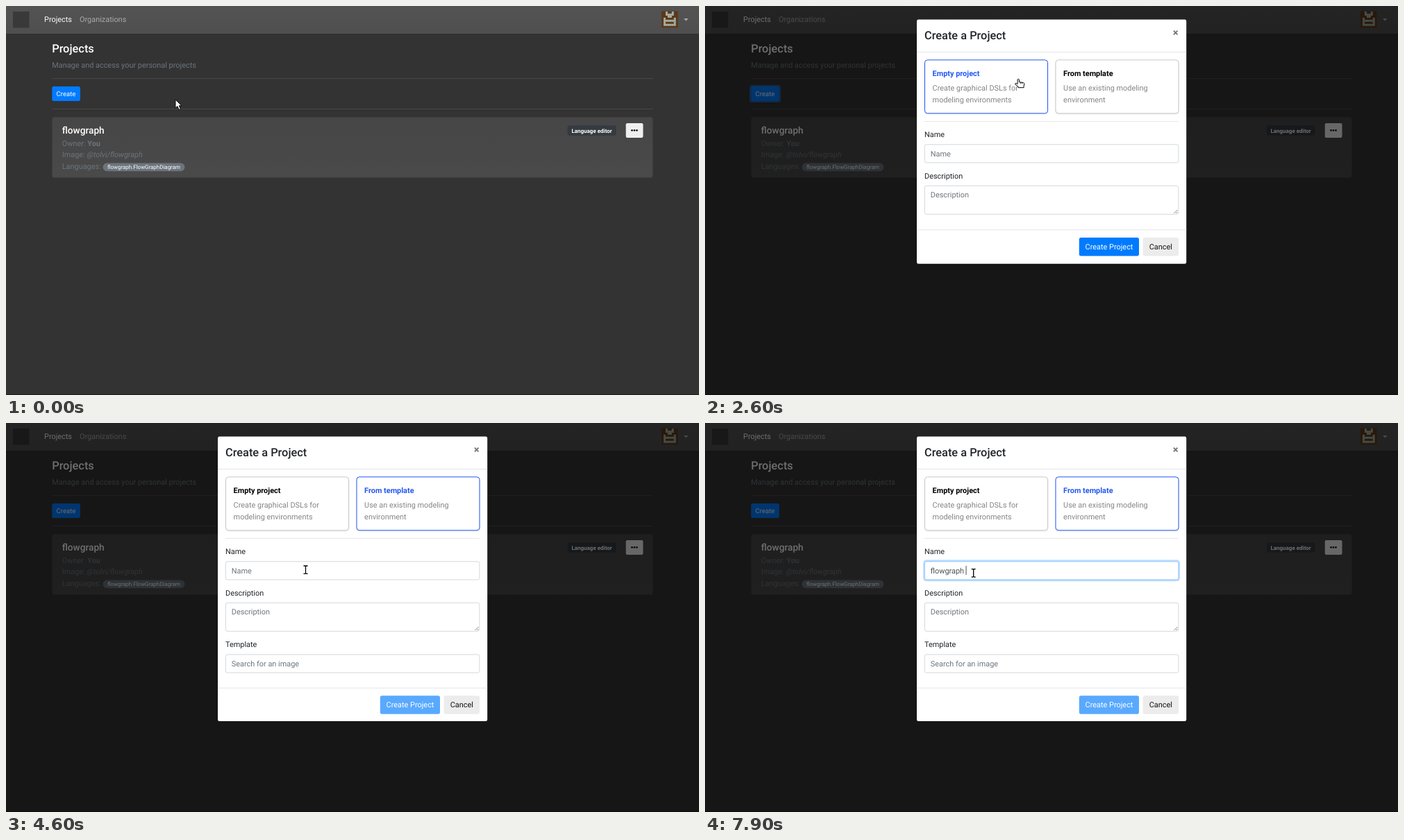
Animation of 998 by 561 pixels, one loop 8 s. Source, as an HTML page:

```html
<!DOCTYPE html>
<html lang="en">
<head>
<meta charset="utf-8">
<title>Create a project</title>
<style>
  html, body { margin: 0; width: 100%; height: 100%; overflow: hidden; background: #333; }
  svg { display: block; width: 998px; height: 561px; }
  text {
    font-family: Roboto, "Liberation Sans", sans-serif;
    text-rendering: geometricPrecision;
    white-space: pre;
  }
</style>
</head>
<body>
<svg id="stage" viewBox="0 0 998 561" xmlns="http://www.w3.org/2000/svg"></svg>
<script>
const LOOP = 8000, STEP = 100, REM = 10.92;
const INK = '#212529', MUTED = '#6c757d', BLUE = '#007bff', ACCENT = '#2457f5';

// Markup helpers
const text = (x, y, str, fill, size = REM, extra = '') =>
  `<text x="${x}" y="${y}" fill="${fill}" font-size="${size}" ${extra}>${str}</text>`;
const rect = (x, y, w, h, fill, r = 0, extra = '') =>
  `<rect x="${x}" y="${y}" width="${w}" height="${h}" rx="${r}" fill="${fill}" ${extra}/>`;
const rule = (x1, x2, y, color) => rect(x1, y, x2 - x1, 0.9, color);
const BOLD = 'font-weight="700"', MEDIUM = 'font-weight="500"', MIDDLE = 'text-anchor="middle"';

function avatar() {
  const rows = ['..#..#..', '..####..', '...##...', '.#....#.', '.######.', '.#....#.', '.######.'];
  const cells = rows.flatMap((row, j) => [...row].map((c, i) =>
    c === '#' ? rect(944 + i * 2.95, 8 + j * 2.95, 3, 3, '#a3b1a6') : ''));
  return rect(944, 7.5, 23.6, 23.7, '#5d3717') + cells.join('');
}

function page() {
  return rect(0, 0, 998, 561, '#333') +
    rect(0, 0, 998, 40.6, 'url(#bar)') + rect(0, 40.2, 998, 0.9, '#2b2b2b') +
    rect(10, 8, 23.4, 23.4, '#393939') +
    text(55, 23.3, 'Projects', '#fff') +
    text(106, 23.3, 'Organizations', '#a9a9a9') +
    avatar() + '<path d="M976 18h6.6l-3.3 3.4z" fill="#a9a9a9"/>' +
    text(66.2, 67.2, 'Projects', '#fff', 16.38, MEDIUM) +
    text(66.2, 88.8, 'Manage and access your personal projects', MUTED) +
    rule(66.3, 931.7, 104.2, '#4b4b4b') + rule(66.3, 931.7, 148, '#4b4b4b') +
    '<rect id="ring" x="65.2" y="115" width="42.8" height="23" rx="3" fill="none" stroke="#268fff" stroke-opacity=".5" stroke-width="2.2"/>' +
    rect(66.3, 116.1, 40.6, 20.9, BLUE, 2.2, 'id="create"') +
    text(86.5, 129.7, 'Create', '#fff', 9.55, MIDDLE) +
    rect(66.7, 160.6, 864.6, 86.8, 'url(#panel)', 2.7, 'stroke="#424242" stroke-width=".8"') +
    text(80.7, 183.7, 'flowgraph', '#fff', 13.65, MEDIUM) +
    text(80.7, 201.8, `Owner: <tspan ${BOLD}>You</tspan>`, MUTED) +
    text(80.7, 218.2, 'Image: <tspan font-style="italic">@tolvi/flowgraph</tspan>', MUTED) +
    text(80.7, 234.5, 'Languages:', MUTED) +
    rect(139.6, 226.4, 117.8, 11.8, MUTED, 5.9) +
    text(198.5, 235, 'flowgraph.FlowGraphDiagram', '#fff', 7.95, MIDDLE) +
    rect(808.6, 172.3, 70, 14.4, '#343a40', 2.7) +
    text(843.6, 182.5, 'Language editor', '#fff', 8, `${MIDDLE} ${BOLD}`) +
    rect(892.7, 169, 24.8, 20.9, '#efefef', 2.2) +
    [901.5, 905, 908.5].map(x => `<circle cx="${x}" cy="179.3" r="1.35" fill="#111"/>`).join('') +
    rect(0, 560, 998, 1, '#1e1e1e');
}

const choice = (id, x, title, line1, line2) =>
  `<g id="${id}">` + rect(x + 0.5, 78.6, 177.2, 77, 'none', 4, 'stroke="#000" stroke-opacity=".08" stroke-width="1.6"') +
  rect(x + 0.5, 77.8, 177, 77, '#fff', 4, 'class="frame" stroke-width="1"') +
  text(x + 11.6, 100.8, title, '#000', REM, `${BOLD} class="title"`) +
  text(x + 11.6, 122.3, line1, '#858585') + text(x + 11.6, 138.7, line2, '#858585') + '</g>';

const field = (label, y, h, hint, id) =>
  text(316, y - 10.6, label, INK) +
  rect(316.3, y, 365.6, h, '#fff', 2.7, `id="${id}" stroke="#ced4da" stroke-width=".9"`) +
  text(324.8, y + 16.8, hint, MUTED, REM, `id="${id}Text"`);

function modal() {
  return rect(305, 19.5, 388.2, 352.3, '#fff', 2.4, 'id="sheet"') +
    text(316, 47.7, 'Create a Project', INK, 16.38, MEDIUM) +
    '<path d="M674.9 35.7l5.6 5.6m0-5.6l-5.6 5.6" stroke="#777" stroke-width="1.9"/>' +
    rule(305, 693.2, 66, '#dee2e6') +
    choice('empty', 316, 'Empty project', 'Create graphical DSLs for', 'modeling environments') +
    choice('template', 504.5, 'From template', 'Use an existing modeling', 'environment') +
    rule(316, 682, 166, '#e5e5e5') +
    rect(315.2, 198.4, 367.8, 28.8, 'none', 3.6, 'id="nameRing" stroke="#bfdeff" stroke-width="2.2"') +
    field('Name', 199.8, 26.2, 'Name', 'name') +
    field('Description', 259.3, 41, 'Description', 'about') +
    '<path d="M675.5 299l5-5m-2 5l2-2" stroke="#666" stroke-width=".8"/>' +
    '<g id="search">' + field('Template', 333.9, 26.2, 'Search for an image', 'image') + '</g>' +
    '<g id="footer">' + rule(305, 693.2, 322.4, '#dee2e6') +
    rect(538.8, 334, 86.2, 26.5, BLUE, 2.7, 'id="submit"') +
    text(582, 350.9, 'Create Project', '#fff', REM, MIDDLE) +
    rect(630.6, 334, 51.4, 26.5, '#ececec', 2.7) +
    text(656.3, 350.9, 'Cancel', '#111', REM, MIDDLE) + '</g>' +
    rect(0, 206, 0.9, 13, '#343a40', 0, 'id="caret"');
}

// Pointer shapes, each with its hot spot at the origin
const pointers = {
  arrow: '<path d="M0 0V12.2L2.9 9.6L5.1 14.5L7.4 13.5L5.2 8.8H9Z" fill="#fff" stroke="#000" stroke-width=".9"/>',
  hand: `<path d="M-1.2 1.4Q0 -.4 1.2 1.4V5L7 5.8Q8.7 6.2 8.5 8L7.8 11V13H-.2V11.6L-4.6 8.2
    Q-4.8 6.4 -3 6.8L-1.2 7.8Z" fill="#fff" stroke="#000" stroke-linejoin="round"/>
    <path d="M3.2 5.4v2m2.2-1.8v2" stroke="#000" stroke-width=".8"/>`,
  beam: `<path d="M-3 -5.7h2.2l.8.8l.8-.8H3M0 -5V5M-3 5.7h2.2l.8-.8l.8.8H3" fill="none" stroke="#fff" stroke-width="2.8"/>
    <path d="M-3 -5.7h2.2l.8.8l.8-.8H3M0 -5V5M-3 5.7h2.2l.8-.8l.8.8H3" fill="none" stroke="#000" stroke-width="1.3"/>`
};

const gradient = (id, top, bottom) =>
  `<linearGradient id="${id}" x2="0" y2="1"><stop stop-color="${top}"/><stop offset="1" stop-color="${bottom}"/></linearGradient>`;

document.getElementById('stage').innerHTML =
  `<defs>${gradient('bar', '#535353', '#4f4f4f')}${gradient('panel', '#464646', '#4a4a4a')}</defs>` +
  page() +
  `<g id="dialog">${rect(0, 0, 998, 561, '#000', 0, 'opacity=".57"')}${modal()}</g>` +
  Object.entries(pointers).map(([id, shape]) => `<g id="${id}">${shape}</g>`).join('');

const $ = id => document.getElementById(id);
const set = (id, attrs) => { for (const k in attrs) $(id).setAttribute(k, attrs[k]); };
const show = (id, on) => set(id, { visibility: on ? 'inherit' : 'hidden' });

// Pointer moves: start, end, from, to, easing, sideways bow
const smooth = p => p * p * (3 - 2 * p), linear = p => p, slowing = p => 1 - (1 - p) ** 2;
const moves = [
  [300, 1000, [244, 135], [85, 126], smooth, 6],
  [1600, 2200, [85, 126], [281, 129.5], p => p ** 1.6, 0],
  [2200, 2400, [281, 129.5], [380, 118.3], linear, 0],
  [2500, 2600, [380, 118.3], [451.3, 104.7], linear, 0],
  [2600, 3400, [451.3, 104.7], [536.7, 88.7], slowing, 0],
  [3900, 4600, [536.7, 88.7], [431.5, 211.7], smooth, 0],
  [4900, 5600, [431.5, 211.7], [386.7, 216.4], smooth, 0]
];

function pointerAt(t) {
  const [start, end, a, b, ease, bow] = moves.filter(m => t >= m[0]).pop() || moves[0];
  const p = ease(Math.min(1, Math.max(0, (t - start) / (end - start))));
  return [a[0] + (b[0] - a[0]) * p, a[1] + (b[1] - a[1]) * p + bow * Math.sin(Math.PI * p)];
}

const inside = (x, y, l, t, r, b) => x >= l && x <= r && y >= t && y <= b;

function pointerKind(x, y, open) {
  if (!open) return 'arrow';
  if (inside(x, y, 316, 77, 494, 155) || inside(x, y, 504, 77, 682, 155)) return 'hand';
  return inside(x, y, 316, 199, 682, 227) ? 'beam' : 'arrow';
}

const WORD = 'flowgraph ';
const keyTimes = [6200, 6300, 6500, 6500, 7100, 7200, 7400, 7500, 7700, 7900];

function choose(id, on) {
  $(id).querySelector('.frame').setAttribute('stroke', on ? ACCENT : '#c9c9c9');
  $(id).querySelector('.title').setAttribute('fill', on ? ACCENT : '#000');
}

function render(t) {
  const open = t >= 1500, fromTemplate = t >= 3700, focused = t >= 5000;
  const [x, y] = pointerAt(t), kind = pointerKind(x, y, open);
  for (const id in pointers) show(id, id === kind);
  set(kind, { transform: `translate(${x} ${y})` });

  const hover = t < 1600 && inside(x, y, 66, 116, 107, 137);
  set('create', { fill: hover ? '#0069d9' : BLUE });
  set('ring', { opacity: !open || t >= 3700 ? 0 : t >= 3600 ? 0.5 : 1 });

  show('dialog', open);
  show('search', fromTemplate);
  choose('empty', !fromTemplate);
  choose('template', fromTemplate);
  set('sheet', { height: fromTemplate ? 410.6 : 352.3 });
  set('footer', { transform: `translate(0 ${fromTemplate ? 59.3 : 0})` });
  set('submit', { fill: fromTemplate ? '#59a9ff' : BLUE });

  set('nameRing', { opacity: !focused ? 0 : t < 5100 ? 0.5 : 1 });
  set('name', { stroke: focused ? '#80bdff' : '#ced4da' });
  const typed = WORD.slice(0, keyTimes.filter(k => t >= k).length);
  $('nameText').textContent = typed || 'Name';
  set('nameText', { fill: typed ? '#495057' : MUTED });
  show('caret', open && (typed || (focused && t < 5500)));
  set('caret', { x: typed ? 324.6 + $('nameText').getComputedTextLength() : 324.4 });
}

function tick() {
  render(Math.floor(performance.now() % LOOP / STEP) * STEP);
  requestAnimationFrame(tick);
}
tick();
</script>
</body>
</html>
```
